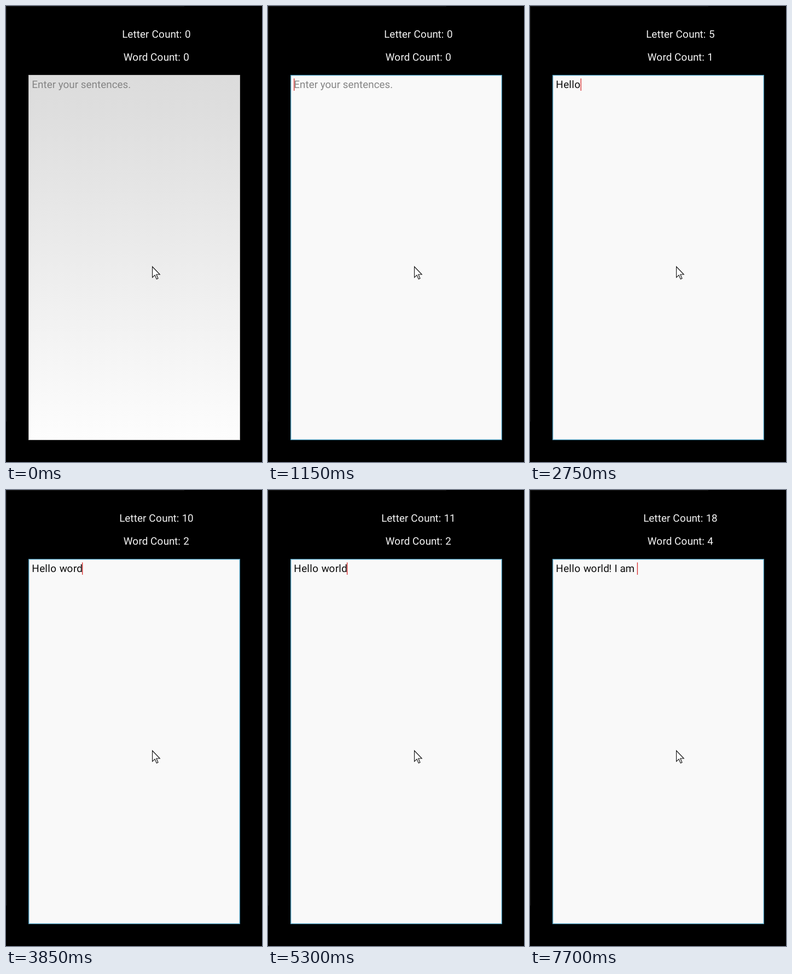
These frames come from a looping animation (468 px wide and 834 px high, 8 s). An HTML page with a canvas:

```html
<!DOCTYPE html>
<html lang="en">
<head>
<meta charset="utf-8">
<title>Letter and word counter</title>
<style>
  html, body { margin: 0; width: 468px; height: 834px; overflow: hidden; background: #000; }
  canvas { display: block; }
</style>
</head>
<body>
<canvas id="stage" width="468" height="834"></canvas>
<script>
const ctx = document.getElementById('stage').getContext('2d');
const LOOP = 8000, FOCUS = 1150, BLINK = 500;
const ZOOM = 1.26, BASE = 15;
const BOX = { x: 41, y: 126, w: 387, h: 668 };
const TEXT_X = 47.3, TEXT_Y = 150;

// Key presses as [time, key]; '<' is backspace.
const keys = [
  [1800, 'H'], [2050, 'e'], [2300, 'l'], [2550, 'l'], [2750, 'o'], [3050, ' '],
  [3350, 'w'], [3450, 'o'], [3600, 'r'], [3850, 'd'],
  [4250, '<'], [4450, 'l'], [4600, 'd'], [4800, ' '], [5300, '<'],
  [5600, '!'], [5800, ' '],
  [7000, 'I'], [7150, ' '], [7300, 'a'], [7450, 'm'], [7700, ' ']
];

const font = size => `${size}px Roboto, "Open Sans", sans-serif`;

// Glyph advances are whole pixels at the base size, then zoomed.
function advance(ch) {
  ctx.font = font(BASE);
  return Math.round(ctx.measureText(ch).width) * ZOOM;
}

const widthOf = s => [...s].reduce((sum, ch) => sum + advance(ch), 0);

function drawText(s, x, y, color) {
  ctx.fillStyle = color;
  for (const ch of s) {
    const step = advance(ch);
    ctx.font = font(BASE * ZOOM);
    ctx.fillText(ch, x, y);
    x += step;
  }
}

function drawLabel(s, y) {
  drawText(s, 274.6 - widthOf(s) / 2, y, '#f4f4f4');
}

function typedAt(t) {
  let text = '', last = FOCUS;
  for (const [time, key] of keys) {
    if (time > t) break;
    text = key === '<' ? text.slice(0, -1) : text + key;
    last = time;
  }
  return { text, last };
}

function drawBox(focused) {
  const { x, y, w, h } = BOX;
  if (focused) {
    ctx.fillStyle = '#f9f9f9';
  } else {
    const g = ctx.createLinearGradient(0, y, 0, y + h);
    g.addColorStop(0, '#dcdcdc');
    g.addColorStop(0.1, '#dedede');
    g.addColorStop(1, '#fdfdfd');
    ctx.fillStyle = g;
  }
  ctx.fillRect(x, y, w, h);
  ctx.lineWidth = focused ? 1.4 : 1;
  ctx.strokeStyle = focused ? '#4f9dbd' : '#bdbdbd';
  const inset = ctx.lineWidth / 2;
  ctx.strokeRect(x + inset, y + inset, w - 2 * inset, h - 2 * inset);
}

function drawPointer() {
  ctx.save();
  ctx.translate(267, 476);
  ctx.scale(ZOOM, ZOOM);
  const p = new Path2D('M.5 .6V16.2L4.1 12.8L6.6 18.6L8.7 17.7L6.3 11.9H11.3Z');
  ctx.fillStyle = '#fff';
  ctx.fill(p);
  ctx.lineWidth = 0.9;
  ctx.strokeStyle = '#111';
  ctx.stroke(p);
  ctx.restore();
}

function draw(t) {
  const focused = t >= FOCUS;
  const { text, last } = typedAt(t);
  const words = text.split(' ').filter(Boolean).length;

  ctx.fillStyle = '#000';
  ctx.fillRect(0, 0, 468, 834);
  ctx.fillStyle = '#1a1a1a';
  ctx.fillRect(0, 0, 326, 1);
  ctx.fillRect(0, 0, 1, 760);

  drawLabel('Letter Count: ' + text.length, 58);
  drawLabel('Word Count: ' + words, 100);
  drawBox(focused);

  if (text) {
    drawText(text, TEXT_X, TEXT_Y, '#0c0c0c');
  } else {
    ctx.font = font(BASE * ZOOM);
    ctx.fillStyle = '#858585';
    ctx.fillText('Enter your sentences.', TEXT_X, TEXT_Y);
  }

  if (focused && Math.floor((t - last) / BLINK) % 2 === 0) {
    ctx.fillStyle = '#d62a2a';
    ctx.fillRect(TEXT_X + widthOf(text) - 0.2, 132.5, 1.3, 22.5);
  }
  drawPointer();
}

ctx.textRendering = 'geometricPrecision';
const start = performance.now();
function tick() {
  draw((performance.now() - start) % LOOP);
  requestAnimationFrame(tick);
}
tick();
</script>
</body>
</html>
```
